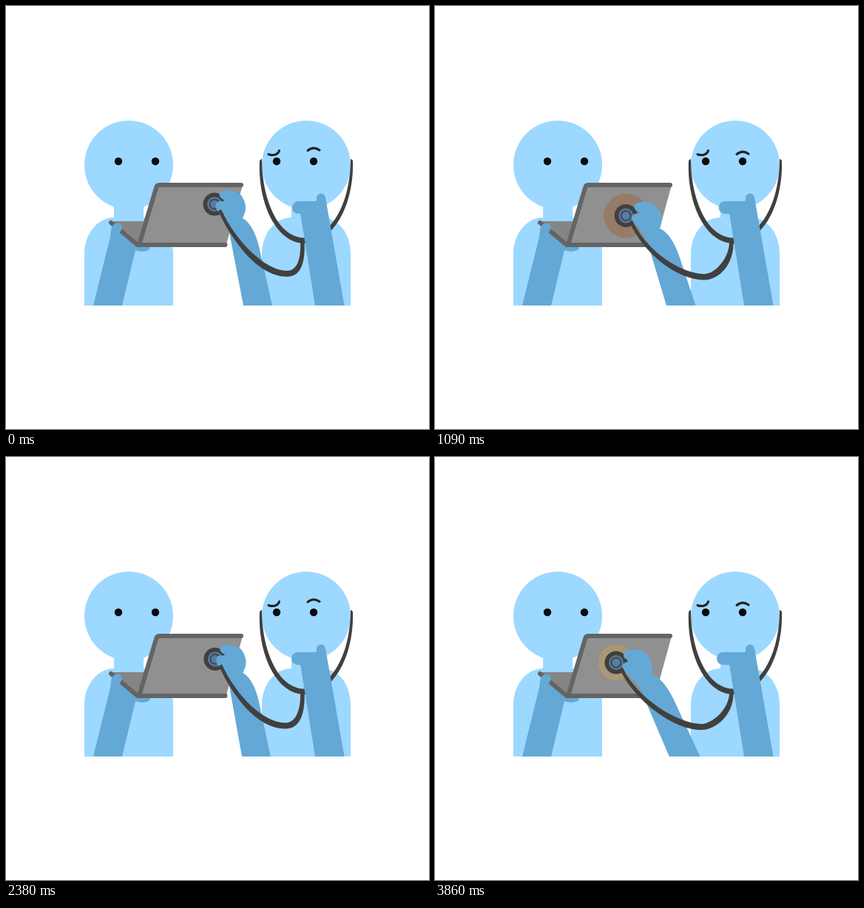
An HTML page for the animation above (3.91 s loop, 572x572 px).

```html
<!DOCTYPE html>
<html lang="en">
<head>
<meta charset="utf-8">
<title>Laptop check-up</title>
<style>
html, body { margin: 0; width: 100%; height: 100%; overflow: hidden; background: #fff; }
svg { display: block; width: 100vw; height: 100vh; }
.skin { fill: #9cd8ff; }
.limb { fill: #64a8d6; }
.dark { fill: #404040; }
.eye { fill: #0a0a0a; }
.edge { fill: none; stroke: #646464; stroke-width: 6; stroke-linecap: round; stroke-linejoin: round; }
.brow { fill: none; stroke: #222; stroke-width: 3; stroke-linecap: round; }
</style>
</head>
<body>
<svg viewBox="0 0 572 572">
  <defs>
    <g id="person" class="skin">
      <circle cx="60" cy="60" r="60"/>
      <path d="M40 105H80V131H120V250H0V180C0 153 18 131 40 131Z"/>
      <path d="M76 131C102 131 120 153 120 180V250H60V131Z"/>
    </g>
    <clipPath id="floor"><rect width="572" height="405"/></clipPath>
    <clipPath id="lid"><path d="M206 240H320L298 321H181Z"/></clipPath>
    <clipPath id="bodyR"><path d="M386 260H426V286C450 286 466 308 466 335V405H346V335C346 308 364 286 386 286Z"/></clipPath>
    <clipPath id="bodyL"><path d="M146 260H186V286C210 286 226 308 226 335V405H106V335C106 308 124 286 146 286Z"/></clipPath>
  </defs>

  <!-- left person -->
  <circle class="skin" cx="166" cy="215" r="60"/>
  <rect class="skin" x="106" y="260" width="120" height="145" clip-path="url(#bodyL)"/>
  <g id="eyes" class="eye"><circle cx="152" cy="210" r="5.2"/><circle cx="202" cy="210" r="5.2"/></g>
  <path class="limb" d="M143 304L118 405H157L176 326L158 304Z"/>
  <ellipse class="limb" cx="184" cy="327" rx="11" ry="5"/>

  <!-- right person -->
  <circle class="skin" cx="406" cy="215" r="60"/>
  <rect class="skin" x="346" y="260" width="120" height="145" clip-path="url(#bodyR)"/>
  <g class="eye"><circle cx="366" cy="210" r="5.2"/><circle cx="416" cy="210" r="5.2"/></g>
  <path class="brow" d="M355 200.5C361 203 368 201 369.500 195.500"/>
  <path id="brow" class="brow"/>
  <path class="dark" d="M343 209L346 206.500C346 262 368 313 403 313.500C443 313 466 262 466 206.500L469 209C471 264 446 320 403 321C364 320 340 264 343 209Z"/>
  <path id="thumb" d="M396 272.500H404" fill="none" stroke="#64a8d6" stroke-width="17" stroke-linecap="round"/>
  <path class="limb" d="M395 264H417C420 264 420 263 420 260A6 6 0 0 1 432 259L457.500 405H418L398 280Z"/>

  <!-- laptop -->
  <path d="M141 291H189L180 322Z" fill="#858585"/>
  <path class="edge" d="M142 293L178 323"/>
  <path d="M206 242H320L298 322H181Z" fill="#909090"/>
  <circle id="glow" clip-path="url(#lid)"/>
  <path class="edge" d="M318 242H207Q204 242 203 246L180 323H296.500"/>
  <path class="limb" d="M141 309C143 304 141 300 145 296C150 291 158 295 157 300C156 305 151 308 150 313Z"/>

  <!-- chest piece, arm and tube -->
  <g id="probe">
    <circle class="dark" r="15.500"/>
    <circle r="10" fill="#5a7893"/>
    <circle r="6.500" fill="#577da5" stroke="#3f4852" stroke-width="2"/>
  </g>
  <g clip-path="url(#floor)">
    <path id="arm" class="limb" d="M284 268C285 264 290 263 294 264L295 262C289 260 287 255 290 251C296 247 308 249 316 254C324 262 326 274 322 282L320 287C330 292 338 308 342 325L360 405L367 440H327L321 405L302 306C300 297 292 284 288 279C284 275 283 271 284 268Z"/>
  </g>
  <path id="tube" class="dark"/>
</svg>
<script>
const LOOP = 3910, CYCLE = 3100;
const $ = id => document.getElementById(id);

// time, probe x y, arm turn dx dy, tube bend x y, thumb x, brow y, glow radius r g b
const keys = [
  [0, 282, 268, 0, 0, 0, 380, 366, 387, 191, 14, 186, 169, 130],
  [310, 257, 275, -8.1, -2, 0, 365, 366.5, 384, 193.5, 24, 186, 169, 130],
  [760, 245, 278, -12.2, -3, 0, 360, 369, 381, 196, 24, 170, 151, 117],
  [1390, 272, 287, 0, -5, 21, 369, 371, 386, 196, 35, 138, 106, 95],
  [1980, 278, 284, 0.5, -3, 16, 372, 370, 383, 193, 22.5, 181, 154, 136],
  [2400, 283, 273, 0.7, -1, 5, 378, 367.5, 386, 191.5, 14, 175, 155, 135],
  [2900, 285, 268, 0.9, 0, 0, 381, 366.5, 387, 190.5, 14, 180, 162, 132]
];

const key = i => {
  const n = keys.length, k = keys[(i + n) % n].slice();
  k[0] += Math.floor(i / n) * CYCLE;
  return k;
};

// shape-preserving slope: zero at turning points
function slope(a, b, c, j) {
  const p = (b[j] - a[j]) / (b[0] - a[0]), q = (c[j] - b[j]) / (c[0] - b[0]);
  return p * q > 0 ? 2 * p * q / (p + q) : 0;
}

function pose(u) {
  let i = keys.length - 1;
  while (keys[i][0] > u) i--;
  const [a, b, c, d] = [key(i - 1), key(i), key(i + 1), key(i + 2)];
  const h = c[0] - b[0], s = (u - b[0]) / h, e = s * s * (3 - 2 * s);
  return b.map((v, j) => j && v + (c[j] - v) * e
    + h * s * (1 - s) * ((1 - s) * slope(a, b, c, j) - s * slope(b, c, d, j)));
}

function set(id, attrs) {
  for (const k in attrs) $(id).setAttribute(k, attrs[k]);
}

function draw(t) {
  const u = t % CYCLE;
  const [, x, y, turn, dx, dy, bx, by, thumb, brow, r, ...rgb] = pose(u);
  set('probe', { transform: `translate(${x} ${y})` });
  set('arm', { transform: `translate(${dx} ${dy}) rotate(${turn} 340 405)` });
  set('glow', { cx: x, cy: y, r, fill: `rgb(${rgb.map(Math.round)})` });
  set('thumb', { d: `M${thumb + 8.5} 272.5H404` });
  set('brow', { d: `M408 ${brow + 4.500}Q416 ${brow - 2} 424 ${brow + 4}` });

  const sx = x + 5, sy = y + 9;
  set('tube', { d: `M${sx} ${sy}C${sx + 18} ${sy + 40} ${bx - 39} ${by} ${bx} ${by}
    C${bx + 20} ${by} 405 ${by - 21} 403.500 317H398
    C399 340 ${bx + 15} ${by - 8} ${bx} ${by - 8}
    C${bx - 30} ${by - 8} ${sx + 23} ${sy + 40} ${sx + 4} ${sy - 2}Z` });

  const lid = Math.max(0.1, Math.min(1, Math.abs(u - 620) / 80));
  set('eyes', { transform: `translate(0 ${210 * (1 - lid)}) scale(1 ${lid})` });
}

const start = performance.now();
function tick() {
  draw((performance.now() - start) % LOOP);
  requestAnimationFrame(tick);
}
tick();
</script>
</body>
</html>
```
